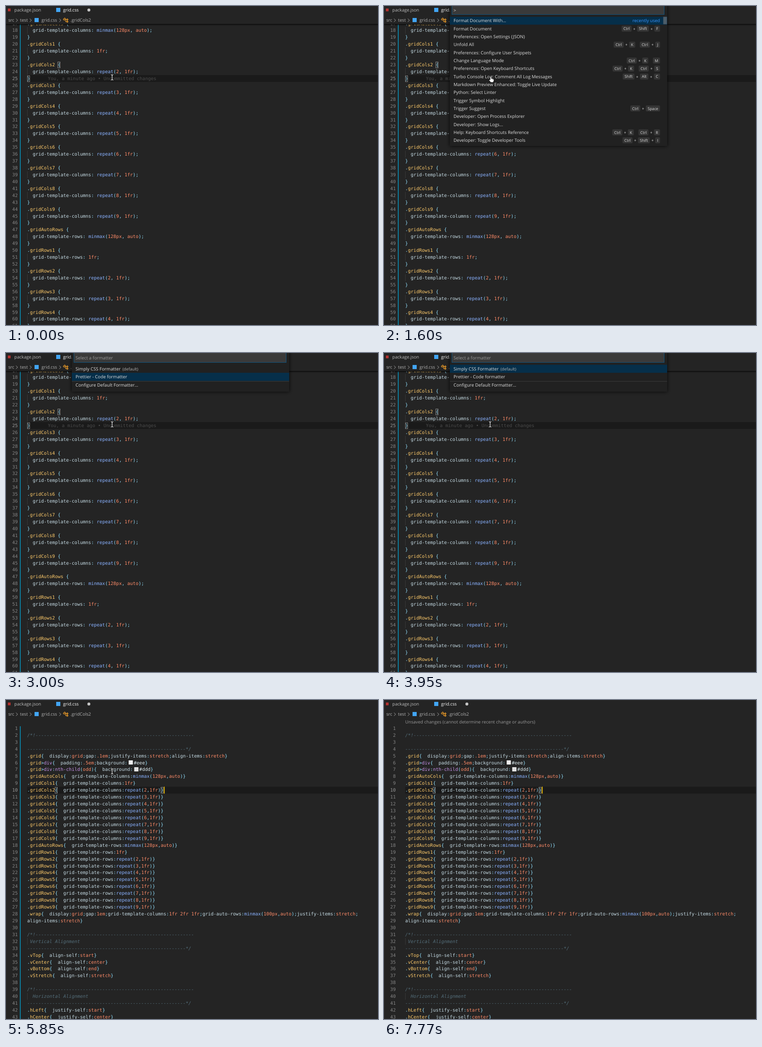
Recreate the animation shown at these times as an HTML page with a canvas. Size 808 px wide and 693 px high, loop 7.92 s.

```html
<!DOCTYPE html>
<html lang="en">
<head>
<meta charset="utf-8">
<title>Formatting a style sheet</title>
<style>
html, body { margin: 0; width: 100%; height: 100%; overflow: hidden; background: #242424; }
canvas { display: block; }
</style>
</head>
<body>
<canvas id="stage" width="808" height="693"></canvas>
<script>
const ctx = document.getElementById('stage').getContext('2d');
const W = 808, H = 693, LOOP = 7920;
const LEFT = 46, CHAR = 6.042, LINE = 14.93;
const MONO = '10.04px "DejaVu Sans Mono", monospace';
const UI = '"Open Sans", "Noto Sans", sans-serif';
const COLOR = {
  bg: '#242424', active: '#1a1a1a', punct: '#93e2ff', name: '#ffcb6b', prop: '#c6dce5',
  fn: '#8ab2ff', value: '#ff8c69', tag: '#c792ea', hex: '#dfeef3', comment: '#546e7a',
  number: '#858585', caret: '#ffcc00', text: '#dedede', selected: '#062f4a'
};

const repeat = (n, make) => Array.from({ length: n }, (_, i) => make(i));

function looseLines() {
  const rule = (name, axis, value) =>
    [`.grid${name} {`, `  grid-template-${axis}: ${value};`, '}'];
  const set = (name, axis, count) => [
    ...rule('Auto' + name, axis, 'minmax(128px, auto)'),
    ...repeat(count, i => rule(name + (i + 1), axis, i ? `repeat(${i + 1}, 1fr)` : '1fr')).flat()
  ];
  return [...set('Cols', 'columns', 9), ...set('Rows', 'rows', 4)];
}

function compactLines() {
  const dashes = '-'.repeat(57);
  const banner = title => ['/*!' + dashes, title, dashes + '*/'];
  const set = (name, axis) => [
    `.gridAuto${name}{  grid-template-${axis}:minmax(128px,auto)}`,
    ...repeat(9, i => `.grid${name}${i + 1}{  grid-template-${axis}:${i ? `repeat(${i + 1},1fr)` : '1fr'}}`)
  ];
  return [
    '', ...banner(''),
    '.grid{  display:grid;gap:.1em;justify-items:stretch;align-items:stretch}',
    '.grid>div{  padding:.5em;background:#eee}',
    '.grid>div:nth-child(odd){  background:#ddd}',
    ...set('Cols', 'columns'), ...set('Rows', 'rows'),
    '.wrap{  display:grid;gap:1em;grid-template-columns:1fr 2fr 1fr;grid-auto-rows:minmax(100px,auto);justify-items:stretch;',
    'align-items:stretch}', '', ...banner(' Vertical Alignment'),
    '.vTop{  align-self:start}', '.vCenter{  align-self:center}',
    '.vBottom{  align-self:end}', '.vStretch{  align-self:stretch}',
    '', ...banner('  Horizontal Alignment'),
    '.hLeft{  justify-self:start}', '.hCenter{  justify-self:center}'
  ];
}

const LOOSE = { lines: looseLines(), first: 17, y: 38.1, row: 25, brackets: [[23, 11], [25, 0]], caret: 52.2 };
const COMPACT = { lines: compactLines(), first: 1, y: 61.5, row: 10, brackets: [[10, 10], [10, 48]], caret: 342.8 };

function box(x, y, w, h, color) {
  ctx.fillStyle = color;
  ctx.fillRect(x, y, w, h);
}

function write(text, x, y, color, font = MONO, align = 'left') {
  ctx.font = font;
  ctx.textAlign = align;
  ctx.fillStyle = color;
  ctx.fillText(text, x, y + 3.4);
}

const label = (text, x, y, color = COLOR.text, size = 9.75, align = 'left') =>
  write(text, x, y, color, `${size}px ${UI}`, align);

function path(points, close) {
  ctx.beginPath();
  points.forEach(([x, y]) => ctx.lineTo(x, y));
  if (close) ctx.closePath();
}

function tokenColor(token, line, at, inSelector) {
  if (token[0] === '#') return COLOR.hex;
  if (!/\w/.test(token)) return COLOR.punct;
  const next = line[at + token.length];
  if (inSelector) {
    if (line[at - 1] === '.') return COLOR.name;
    return token === 'odd' ? COLOR.value : COLOR.tag;
  }
  return next === ':' ? COLOR.prop : next === '(' ? COLOR.fn : COLOR.value;
}

function drawLine(line, y) {
  if (/^\s/.test(line)) box(LEFT, y - 7.5, 1, LINE, '#383838');
  if (/---|Alignment/.test(line)) {
    write(line, LEFT, y, COLOR.comment, 'italic ' + MONO);
    return;
  }
  const brace = line.indexOf('{');
  let shift = 0;
  for (const match of line.matchAll(/#\w+|\.\d\w*|[\w-]+|[^\s\w]/g)) {
    const token = match[0], at = match.index;
    if (token[0] === '#') {
      box(LEFT + at * CHAR + 3, y - 5, 9, 9, '#ffffff');
      box(LEFT + at * CHAR + 4, y - 4, 7, 7, token);
      shift = 14;
    }
    write(token, LEFT + at * CHAR + shift, y, tokenColor(token, line, at, at < brace));
  }
}

function drawEditor(doc, caret, blame) {
  const rowY = n => doc.y + (n - doc.first) * LINE;
  const activeY = rowY(doc.row);
  ctx.save();
  ctx.beginPath();
  ctx.rect(0, 40, W, H - 40);
  ctx.clip();
  box(LEFT, activeY - 7.5, W, LINE, COLOR.active);
  if (blame) {
    box(LEFT, rowY(24) - 7.5, 1, LINE, '#707070');
    write('You, a minute ago • Uncommitted changes', 91, activeY, '#4b4b4b');
  }
  doc.lines.forEach((line, i) => {
    const n = doc.first + i, y = rowY(n);
    write(n, 25.6, y, n === doc.row ? '#9a9a9a' : COLOR.number, MONO, 'right');
    drawLine(line, y);
  });
  ctx.strokeStyle = '#888888';
  ctx.lineWidth = 1;
  for (const [n, col] of doc.brackets) {
    ctx.strokeRect(Math.round(LEFT + col * CHAR) + .5, Math.round(rowY(n) - 7) + .5, 5, 13);
  }
  if (caret) box(doc.caret, activeY - 7.5, 1.7, LINE, COLOR.caret);
  ctx.restore();
}

function chevron(x) {
  path([[x - 1.7, 27.5], [x + 1.7, 31], [x - 1.7, 34.5]]);
  ctx.strokeStyle = '#a9a9a9';
  ctx.lineWidth = 1;
  ctx.stroke();
}

function classIcon(x, y) {
  ctx.strokeStyle = '#ee9d28';
  ctx.lineWidth = 1.2;
  path([[x, y + 3], [x + 3, y], [x + 5, y + 2], [x + 2, y + 5]], true);
  ctx.stroke();
  path([[x + 4, y + 3.5], [x + 7, y + 3.5]]);
  ctx.stroke();
  path([[x + 5, y + 3.5], [x + 5, y + 8], [x + 7, y + 8]]);
  ctx.stroke();
  for (const dy of [3.5, 8]) {
    path([[x + 7, y + dy], [x + 8.7, y + dy - 1.7], [x + 10.4, y + dy], [x + 8.7, y + dy + 1.7]], true);
    ctx.stroke();
  }
}

function drawHeader() {
  const crumb = (text, x) => label(text, x, 31, '#b2b2b2', 9.65);
  box(4, 5.5, 6, 6, '#b3312f');
  label('package.json', 18, 9, '#bcbcbc', 9.65);
  box(109, 4, 9, 9, '#42a5f5');
  label('grid.css', 124, 9, '#ffffff', 9.65);
  ctx.beginPath();
  ctx.arc(180, 8.8, 3.2, 0, Math.PI * 2);
  ctx.fillStyle = '#c5c5c5';
  ctx.fill();
  crumb('src', 5);
  crumb('test', 30.5);
  box(62, 26, 9, 9, '#42a5f5');
  crumb('grid.css', 77);
  crumb('.gridCols2', 140);
  [23.5, 53.5, 117.5].forEach(chevron);
  classIcon(124.5, 26);
}

function drawPanel(height, inputBottom) {
  ctx.save();
  ctx.shadowColor = 'rgba(0,0,0,.85)';
  ctx.shadowBlur = 8;
  box(143, -10, 472, height + 10, '#212121');
  ctx.restore();
  box(147, -2, 462, inputBottom + 2, '#3a3a3a');
  ctx.strokeStyle = '#0f5480';
  ctx.lineWidth = 1;
  ctx.strokeRect(147.5, -2, 461, inputBottom + 1.5);
}

// Chords are separated by a space, the keys of a chord by "+".
function drawKeys(shortcut, y) {
  let right = 599.5;
  shortcut.split(' ').reverse().forEach((chord, c) => {
    if (c) right -= 10;
    chord.split('+').reverse().forEach((key, k) => {
      if (k) {
        label('+', right - 6, y, COLOR.text, 8.6, 'center');
        right -= 12;
      }
      ctx.font = `8.3px ${UI}`;
      const width = ctx.measureText(key).width + 8;
      ctx.beginPath();
      ctx.roundRect(right - width, y - 6.5, width, 13, 2);
      ctx.fillStyle = '#353535';
      ctx.fill();
      label(key, right - width + 4, y - .3, COLOR.text, 8.3);
      right -= width;
    });
  });
}

const COMMANDS = [
  ['Format Document With...'],
  ['Format Document', 'Ctrl+Shift+F'],
  ['Preferences: Open Settings (JSON)'],
  ['Unfold All', 'Ctrl+K Ctrl+J'],
  ['Preferences: Configure User Snippets'],
  ['Change Language Mode', 'Ctrl+K M'],
  ['Preferences: Open Keyboard Shortcuts', 'Ctrl+K Ctrl+S'],
  ['Turbo Console Log: Comment All Log Messages', 'Shift+Alt+C'],
  ['Markdown Preview Enhanced: Toggle Live Update'],
  ['Python: Select Linter'],
  ['Trigger Symbol Highlight'],
  ['Trigger Suggest', 'Ctrl+Space'],
  ['Developer: Open Process Explorer'],
  ['Developer: Show Logs...'],
  ['Help: Keyboard Shortcuts Reference', 'Ctrl+K Ctrl+R'],
  ['Developer: Toggle Developer Tools', 'Ctrl+Shift+I']
];

function drawPalette(caret) {
  drawPanel(304, 19);
  label('>', 151, 9.5);
  if (caret) box(158, 2, 1, 14, '#cccccc');
  box(143, 23.5, 472, 17, COLOR.selected);
  box(606.5, 23.5, 8, 16, '#4c5c68');
  COMMANDS.forEach(([name, keys], i) => {
    const y = 32 + i * 17.32;
    label(name, 151, y);
    if (keys) drawKeys(keys, y);
  });
  label('recently used', 599.5, 32, '#3794ff', 9.6, 'right');
}

function drawPicker(selected, caret) {
  drawPanel(84, 21);
  label('Select a formatter', 151, 10.3, '#9a9a9a');
  if (caret) box(151, 3, 1, 14, '#cccccc');
  box(143, 25.5 + selected * 17.5, 472, 17.5, COLOR.selected);
  label('Simply CSS Formatter', 151, 34.3);
  label('(default)', 253, 34.3, '#b4b4b4', 8.8);
  label('Prettier - Code formatter', 151, 51.7);
  box(143, 61, 472, 1, '#3a3a3a');
  label('Configure Default Formatter...', 151, 70);
}

function drawBeam(x, y) {
  const shape = () => {
    path([[x - 2.5, y - 6], [x, y - 5], [x + 2.5, y - 6]]);
    ctx.moveTo(x, y - 5);
    ctx.lineTo(x, y + 5);
    ctx.moveTo(x - 2.5, y + 6);
    ctx.lineTo(x, y + 5);
    ctx.lineTo(x + 2.5, y + 6);
    ctx.stroke();
  };
  ctx.strokeStyle = '#111111';
  ctx.lineWidth = 3;
  shape();
  ctx.strokeStyle = '#ffffff';
  ctx.lineWidth = 1.2;
  shape();
}

function drawHand(x, y) {
  path([[0, 0], [1.6, 0], [2, 4.5], [7, 5.8], [7.5, 8], [6, 12], [1, 12], [-2.6, 7.8], [-2, 6.4], [0, 7.8]]
    .map(([dx, dy]) => [x + dx, y + dy]), true);
  ctx.strokeStyle = '#111111';
  ctx.lineWidth = 1.5;
  ctx.stroke();
  ctx.fillStyle = '#ffffff';
  ctx.fill();
}

const during = (t, ...spans) => spans.some(([from, to]) => t >= from && t < to);

function draw(t) {
  const formatted = t >= 5850;
  const editorCaret = during(t, [390, 950], [2020, 2150], [5560, 6280], [6830, 7210], [7770, LOOP]);

  box(0, 0, W, H, COLOR.bg);
  drawEditor(formatted ? COMPACT : LOOSE, editorCaret, !formatted);
  if (t < 5990) {
    const top = formatted ? 57 : 40;
    box(30, top, 2, H - top, '#0c7d9d');
  }
  if (!formatted) {
    const shade = ctx.createLinearGradient(0, 39, 0, 43);
    shade.addColorStop(0, 'rgba(0,0,0,.7)');
    shade.addColorStop(1, 'rgba(0,0,0,0)');
    box(0, 39, W, 4, shade);
  }
  if (t >= 6280) {
    label('Unsaved changes (cannot determine recent change or authors)', LEFT, 47.7, '#999999', 9.65);
  }
  drawHeader();

  if (during(t, [1070, 2020])) drawPalette(t < 1600);
  if (during(t, [2150, 5560])) {
    const caret = during(t, [2150, 2540], [3150, 3690], [4240, 4630], [5190, 5560]);
    drawPicker(during(t, [3000, 3950]) ? 1 : 0, caret);
  }

  if (during(t, [1190, 2020])) drawHand(231, 153.5);
  else if (t < 6950) drawBeam(230.5, 155);
  else if (t < 7090) drawBeam(279.5, 205);
  else if (t < 7210) drawBeam(566.5, 616);
}

ctx.textRendering = 'geometricPrecision';

function tick() {
  draw(performance.now() % LOOP);
  requestAnimationFrame(tick);
}
tick();
</script>
</body>
</html>
```
